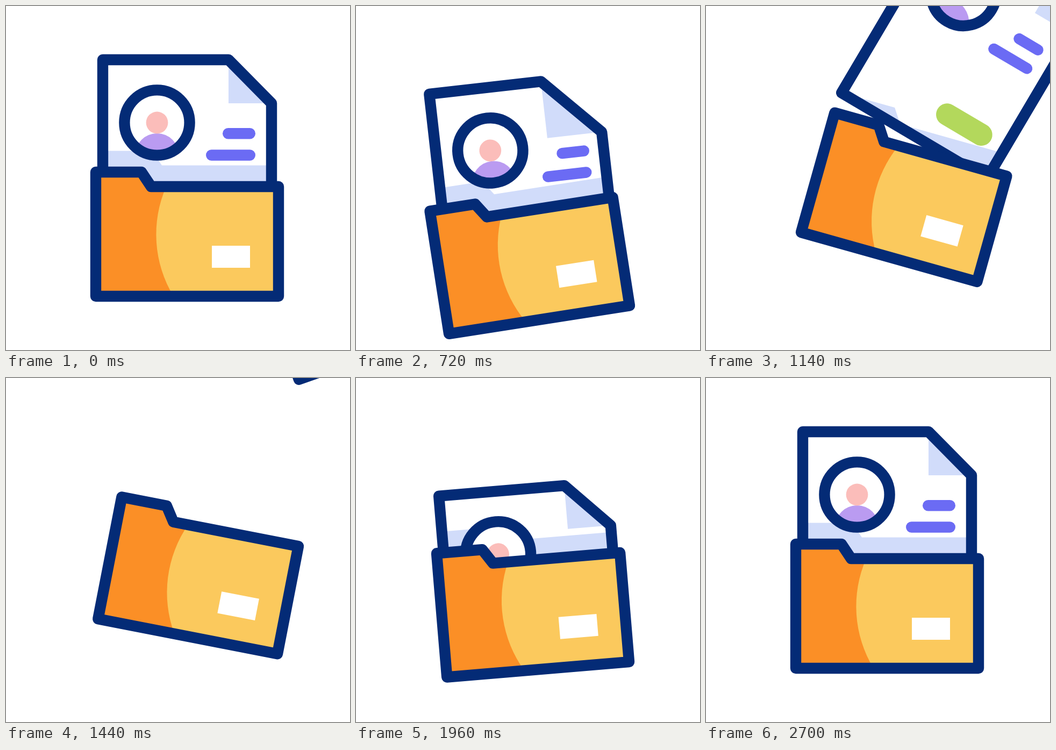
An HTML page with a canvas for the animation above (3 s loop, 640 px wide and 640 px high).

```html
<!DOCTYPE html>
<html lang="en">
<head>
<meta charset="utf-8">
<title>Folder and profile sheet</title>
<style>
  html, body { margin: 0; width: 100%; height: 100%; overflow: hidden; background: #fff; }
  canvas { display: block; width: 640px; height: 640px; }
</style>
</head>
<body>
<canvas id="stage" width="640" height="640"></canvas>
<script>
const ctx = document.getElementById('stage').getContext('2d');
const LOOP = 3000;
const INK = '#042b76', SHADE = '#d1dcfa', LINE = '#6b6bf4';

const inOut = p => p * p * (3 - 2 * p);
const inQuad = p => p * p;
const inCubic = p => p ** 3;
const outCubic = p => 1 - (1 - p) ** 3;

// Eases through [time, value, ease into it], starting from rest at 220 ms
function move(t, ...keys) {
  let t0 = 220, v0 = 0;
  for (const [t1, v1, ease = inOut] of keys) {
    if (t < t1) return v0 + (v1 - v0) * ease(Math.max(0, (t - t0) / (t1 - t0)));
    t0 = t1;
    v0 = v1;
  }
  return v0;
}

// Crouch, toss, catch, settle; the sheet moves in the folder's own space
const poseAt = t => ({
  tilt: move(t, [760, -9], [1190, 16.6], [1940, -4.8], [2400, 0]),
  lift: move(t, [600, 22.4], [1080, -22.5], [1820, -25], [1960, -13], [2360, 0]),
  sheetX: move(t, [720, 2.8], [1140, -16], [1440, 32], [1780, 0]),
  sheetY: move(t, [775, 0], [1440, -600, inQuad], [1960, 103, outCubic], [2270, -37.5], [2700, 0]),
  sheetTilt: move(t, [690, 2.4], [1440, 60, inCubic], [1780, 0, outCubic]),
  fold: move(t, [720, 25], [1000, 0])
});

function turn(x, y, dx, dy, deg) {
  ctx.translate(x + dx, y + dy);
  ctx.rotate(deg * Math.PI / 180);
  ctx.translate(-x, -y);
}

function fill(path, color) {
  ctx.fillStyle = color;
  ctx.fill(path);
}

function outline(path) {
  ctx.strokeStyle = INK;
  ctx.lineWidth = 20.4;
  ctx.lineJoin = 'round';
  ctx.stroke(path);
}

function disc(x, y, r) {
  const path = new Path2D();
  path.arc(x, y, r, 0, Math.PI * 2);
  return path;
}

function pill(x0, x1, y, width, color) {
  ctx.strokeStyle = color;
  ctx.lineWidth = width;
  ctx.lineCap = 'round';
  ctx.beginPath();
  ctx.moveTo(x0 + width / 2, y);
  ctx.lineTo(x1 - width / 2, y);
  ctx.stroke();
}

const front = new Path2D('M167 309H252L270 336H507V540H167Z');
const glow = new Path2D('M298 336A222 222 0 0 0 311.6 540H507V336Z');
const shadow = new Path2D('M60 269.5H272L290 296.5H620V560H60Z');
const label = new Path2D('M383 446H454V487H383Z');
const ring = disc(281, 217, 60.6);

function drawSheet({ sheetX, sheetY, sheetTilt, fold }) {
  const place = () => turn(337, 492, sheetX, sheetY, sheetTilt);
  const x = 414 - fold, y = 181 + fold, right = 494 - fold / 8;
  const sheet = new Path2D(`M180 100H${x}L${right} ${y}V492H180Z`);

  ctx.save();
  ctx.beginPath();
  ctx.rect(-2000, -2000, 4000, 2530);
  ctx.clip();

  // The shadow stays with the folder but only falls on the sheet
  ctx.save();
  const folderSpace = ctx.getTransform();
  place();
  fill(sheet, '#fff');
  ctx.clip(sheet);
  ctx.setTransform(folderSpace);
  fill(shadow, SHADE);
  ctx.restore();

  place();
  fill(new Path2D(`M${x} 100V${y}H${right}Z`), SHADE);
  pill(403, 464, 237.3, 20.4, LINE);
  pill(372, 464, 277.5, 20.4, LINE);
  pill(349, 464, 426.7, 41, '#b3d85c');

  fill(ring, '#fff');
  ctx.save();
  ctx.clip(ring);
  fill(disc(281, 278, 41), '#ba9bf1');
  fill(disc(281, 217, 20.4), '#fbbdba');
  ctx.restore();
  outline(ring);
  outline(sheet);
  ctx.restore();
}

function drawFolder() {
  fill(front, '#fb8f26');
  fill(glow, '#fbc95d');
  fill(label, '#fff');
  outline(front);
}

function draw(t) {
  const pose = poseAt(t);
  ctx.fillStyle = '#fff';
  ctx.fillRect(0, 0, 640, 640);
  ctx.save();
  turn(522, 528, 0, pose.lift, pose.tilt);
  drawSheet(pose);
  drawFolder();
  ctx.restore();
}

const start = performance.now();
function tick() {
  draw((performance.now() - start) % LOOP);
  requestAnimationFrame(tick);
}
tick();
</script>
</body>
</html>
```
